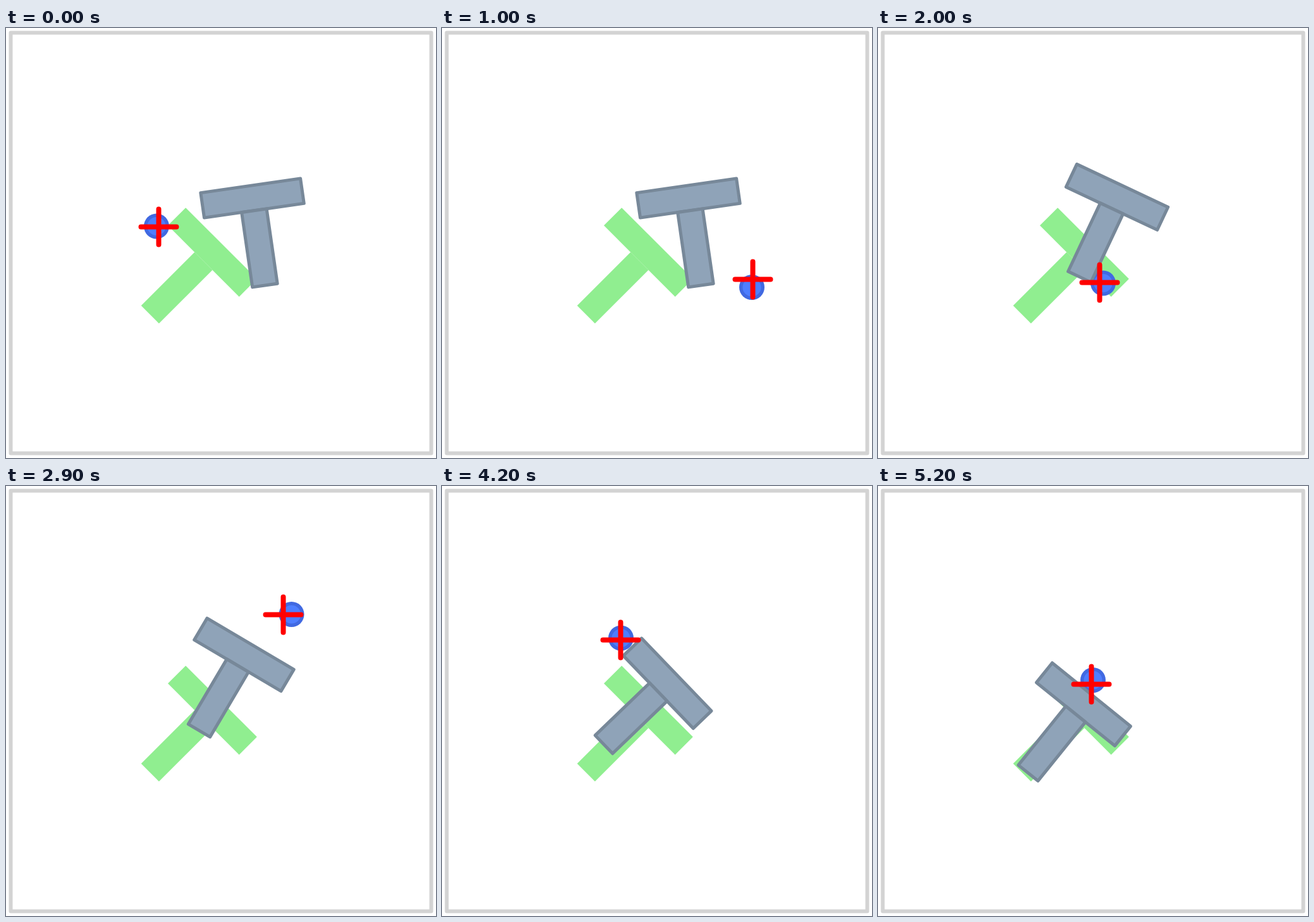
An HTML page with a canvas that plays this animation: 680 by 680 pixels, repeating every 5300 ms.

```html
<!DOCTYPE html>
<html>
<head>
<meta charset="utf-8">
<style>
  html, body { margin: 0; width: 100%; height: 100%; overflow: hidden; background: #fff; }
  canvas { display: block; }
</style>
</head>
<body>
<canvas id="stage" width="680" height="680"></canvas>
<script>
const ctx = document.getElementById('stage').getContext('2d');
const STEP = 100, STEPS = 53;
const UNIT = 39.84; // thickness of both bars of the T

// Keys: step, x, y
const agentKeys = [
  [0, 238, 313.5], [2, 246, 326], [4, 322, 452], [6, 424, 502], [8, 478, 452],
  [10, 490, 410], [12, 472, 386], [14, 440, 395], [16, 403, 405], [18, 372, 405],
  [20, 356, 403.5], [22, 342, 404], [24, 370, 415], [26, 480, 340], [27, 490, 272],
  [29, 451.5, 203], [30, 437, 209], [32, 426, 262], [34, 411.5, 305.5], [35, 408, 310],
  [36, 400, 283], [39, 345, 220], [42, 283, 240.5], [44, 291, 215], [46, 340, 196],
  [48, 379, 234], [49, 381, 265], [50, 372, 284], [52, 340, 307]
];
const targetKeys = [
  [0, 241.5, 314.5], [1, 238, 308], [2, 256, 345], [3, 300, 420], [5, 402, 508],
  [6, 447, 488], [8, 490, 440], [10, 491.5, 397.5], [11, 482, 372], [12, 460, 366],
  [14, 416, 386], [16, 368, 400], [18, 323, 404], [20, 350.5, 402.5], [21, 308, 412],
  [22, 335, 431], [24, 516, 397], [26, 505, 265], [29, 438.5, 203.5], [30, 400, 201],
  [32, 404, 255], [34, 409.5, 313.5], [36, 388, 265], [38, 352, 198], [40, 306, 210],
  [42, 282.5, 243.5], [45, 322, 178], [48, 378, 242], [50, 356, 299], [52, 337.5, 313.5]
];
// Keys: step, x, y, angle in degrees
const blockKeys = [
  [13, 386.7, 249.3, -8.2], [14, 386.7, 249.3, -6], [16, 386.6, 249.3, 8],
  [18, 386.6, 249.3, 19.5], [20, 386.5, 249.3, 25.2], [22, 386.6, 249.6, 30.6],
  [31.5, 386.6, 249.6, 30.6], [34, 371.1, 293.5, 44.2], [35, 370.8, 298.2, 46.1],
  [42, 370.8, 298.2, 46.1], [43, 372, 299.4, 46.1], [49, 372, 299.4, 46.1],
  [52, 337.5, 329.8, 38.9]
];

function sample(keys, t) {
  const next = keys.findIndex(key => key[0] >= t);
  if (next <= 0) return keys[0].slice(1);
  const a = keys[next - 1], b = keys[next];
  const u = (t - a[0]) / (b[0] - a[0]);
  return a.slice(1).map((v, i) => v + (b[i + 1] - v) * u);
}

function drawTee([x, y, degrees], fill, edge) {
  ctx.save();
  ctx.translate(x, y);
  ctx.rotate(degrees * Math.PI / 180);
  ctx.fillStyle = fill;
  ctx.lineWidth = 5;
  for (const box of [[-2 * UNIT, 0, 4 * UNIT, UNIT], [-UNIT / 2, UNIT, UNIT, 3 * UNIT]]) {
    ctx.fillRect(...box);
    if (edge) {
      ctx.strokeStyle = edge;
      ctx.strokeRect(...box);
    }
  }
  ctx.restore();
}

function drawDisc([x, y], radius, color) {
  ctx.fillStyle = color;
  ctx.beginPath();
  ctx.arc(x, y, radius, 0, 2 * Math.PI);
  ctx.fill();
}

function drawCross([x, y]) {
  const arm = 28;
  ctx.strokeStyle = '#f00';
  ctx.lineWidth = 8;
  ctx.beginPath();
  ctx.moveTo(x - arm, y);
  ctx.lineTo(x + arm, y);
  ctx.moveTo(x, y - arm);
  ctx.lineTo(x, y + arm);
  ctx.stroke();
}

function draw(step) {
  ctx.fillStyle = '#fff';
  ctx.fillRect(0, 0, 680, 680);
  ctx.lineCap = ctx.lineJoin = 'round';
  ctx.strokeStyle = '#d3d3d3';
  ctx.lineWidth = 6;
  ctx.strokeRect(7.5, 7.5, 665, 665);

  drawTee([340.5, 340.5, 45], '#90ee90');
  const agent = sample(agentKeys, step);
  drawDisc(agent, 20, '#4169e1');
  drawDisc(agent, 14.6, '#4e7eff');
  drawTee(sample(blockKeys, step), '#8fa3b8', '#778899');
  drawCross(sample(targetKeys, step));
}

const start = performance.now();
function tick() {
  draw(Math.floor((performance.now() - start) / STEP) % STEPS);
  requestAnimationFrame(tick);
}
tick();
</script>
</body>
</html>
```
